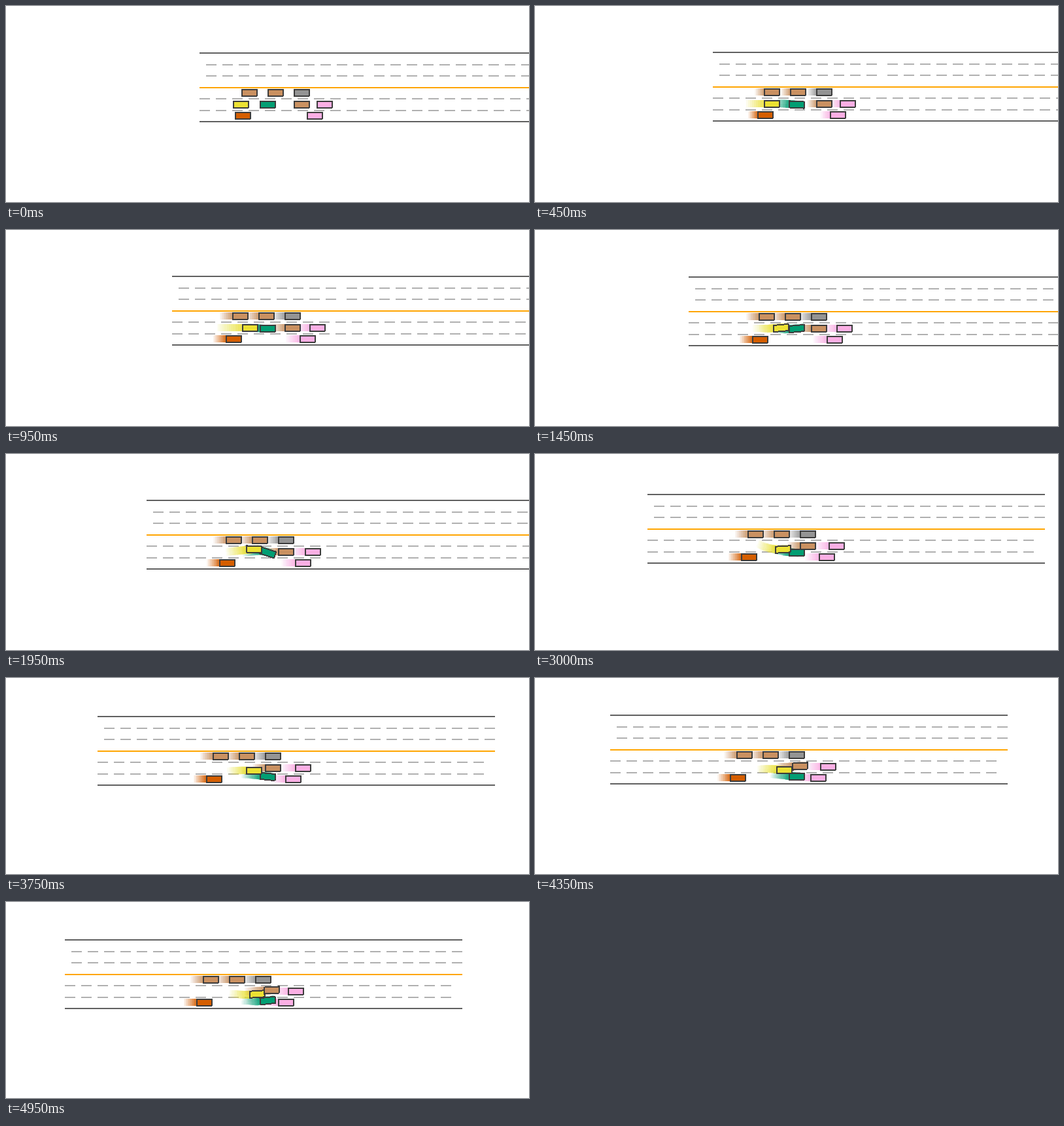
Animation of 800 by 300 pixels, one loop 5 s. Source, as a matplotlib script:

```python
import numpy as np
import matplotlib.pyplot as plt
from matplotlib.animation import FuncAnimation
from matplotlib.collections import PolyCollection
from matplotlib.colors import to_rgba

W, H, DPI = 800, 300, 100
FRAMES, STEP = 100, 0.05
END = (FRAMES - 1) * STEP
CAR_W, CAR_H, BORDER = 25, 12, 2
TRAIL = 13
LANES = (61, 79, 96)
SLOW, FAST = 29.7, 32.7

EDGE, DASH, CENTER, OUTLINE = "#606060", "#b0b0b0", "#ffa500", "#3c3c3c"
GREEN, YELLOW, BROWN = "#029e73", "#ece133", "#ca9161"
PINK, GREY, ORANGE = "#fbafe4", "#949494", "#d55e00"


def track(*points):
    """Straight runs through (time, value) key points."""
    times, values = zip(*points)
    return lambda t: float(np.interp(t, times, values))


# The camera follows the green car, so its driving moves the road instead.
road_x = track((0, 296), (.55, 267), (1.1, 249), (3, 172), (4.95, 90))
road_y = track((.2, 72), (.6, 71), (1.1, 71), (1.65, 73), (1.95, 71), (2.2, 66),
               (2.45, 64), (2.8, 62), (3.1, 62), (4.3, 57), (4.65, 57), (4.95, 58.4))
gap = track((0, 41), (.5, 38), (.95, 27), (1.95, 21.5), (3.75, 21), (4.95, 16.5))
yellow_y = track((1.1, 79), (2, 75.2), (2.5, 82.5), (2.8, 84), (3.2, 83),
                 (3.9, 83), (4.6, 84), (4.95, 83))


# Each path gives a car's centre on the road at a time.
def green(t):
    return 400.5 - road_x(t), 151 - road_y(t)


def yellow(t):
    return green(t)[0] - gap(t), yellow_y(t)


def cruise(x, lane, speed):
    return lambda t: (x + speed * t, LANES[lane])


def bumped(t):
    push = max(0, t - 4)
    return 156.5 + SLOW * t + 13.7 * push, LANES[1] - 2.1 * push


CARS = [
    (GREEN, green),
    (YELLOW, yellow),
    *((color, cruise(76.5 + 40 * i, 0, SLOW)) for i, color in enumerate((BROWN, BROWN, GREY))),
    (BROWN, bumped),
    (PINK, cruise(191.5, 1, FAST)),
    (ORANGE, cruise(66.5, 2, SLOW)),
    (PINK, cruise(176.5, 2, FAST)),
]


def heading(path, t, span=0.15):
    (x0, y0), (x1, y1) = path(max(0, t - span)), path(min(END, t + span))
    return np.arctan2(y1 - y0, x1 - x0)


def box(x, y, w, h):
    return np.array([(x, y), (x + w, y), (x + w, y + h), (x, y + h)])


def body(w, h):
    """Centred box without its bottom right pixel."""
    x, y = w / 2, h / 2
    return np.array([(-x, -y), (x, -y), (x, y - 1), (x - 1, y - 1), (x - 1, y), (-x, y)])


def panel(w, h):
    return box(-w / 2, -h / 2, w, h)


def place(shape, path, t, origin):
    a = heading(path, t)
    spin = np.array([(np.cos(a), np.sin(a)), (-np.sin(a), np.cos(a))])
    x, y = path(t)
    cx = np.floor(origin[0] + x - CAR_W / 2 + 0.5) + CAR_W / 2
    cy = np.floor(origin[1] + y + 0.5)
    return shape @ spin + (cx, cy)


def road(x, y):
    """Dashes first, then the solid lines."""
    upper = [10 + 25 * k for k in range(10)] + [267 + 25 * k for k in range(14)]
    lower = [25 * k for k in range(24)]
    for rows, starts in (((18, 35), upper), ((70, 88), lower)):
        for row in rows:
            for s in starts:
                yield box(x + s, y + row - 1, 16, 2), to_rgba(DASH)
    for row, color in ((0, EDGE), (53, CENTER), (105, EDGE)):
        yield box(x, y + row - 1, 608, 2), to_rgba(color)


def trail(color, path, t, origin):
    """Past places, stacked so that the fade is even."""
    ghost = box(-CAR_W / 2, -CAR_H / 2, CAR_W, CAR_H - 1)
    for k in range(TRAIL, 0, -1):
        past = t - k * STEP
        if past > -1e-9:
            yield place(ghost, path, max(past, 0), origin), to_rgba(color, 1 / (k + 2))


def car(color, path, t, origin):
    slim = 1 if abs(heading(path, t)) > 0.01 else 0
    w, h = CAR_W - slim, CAR_H - slim
    yield place(body(w, h), path, t, origin), to_rgba(OUTLINE)
    yield place(panel(w - 2 * BORDER, h - 2 * BORDER), path, t, origin), to_rgba(color)


def scene(t):
    origin = road_x(t), road_y(t)
    yield from road(*map(round, origin))
    for part in (trail, car):
        for color, path in CARS:
            yield from part(color, path, t, origin)


fig = plt.figure(figsize=(W / DPI, H / DPI), dpi=DPI, facecolor="white")
ax = fig.add_axes([0, 0, 1, 1])
ax.set(xlim=(0, W), ylim=(H, 0))
ax.axis("off")
shapes = PolyCollection([], linewidths=0, edgecolors="none", antialiaseds=False)
ax.add_collection(shapes, autolim=False)


def draw(i):
    polys, colors = zip(*scene(i * STEP))
    shapes.set_verts(polys)
    shapes.set_facecolor(colors)
    return [shapes]


anim = FuncAnimation(fig, draw, frames=FRAMES, interval=1000 * STEP,
                     init_func=lambda: draw(0), repeat=True, repeat_delay=0)
plt.show()
```
